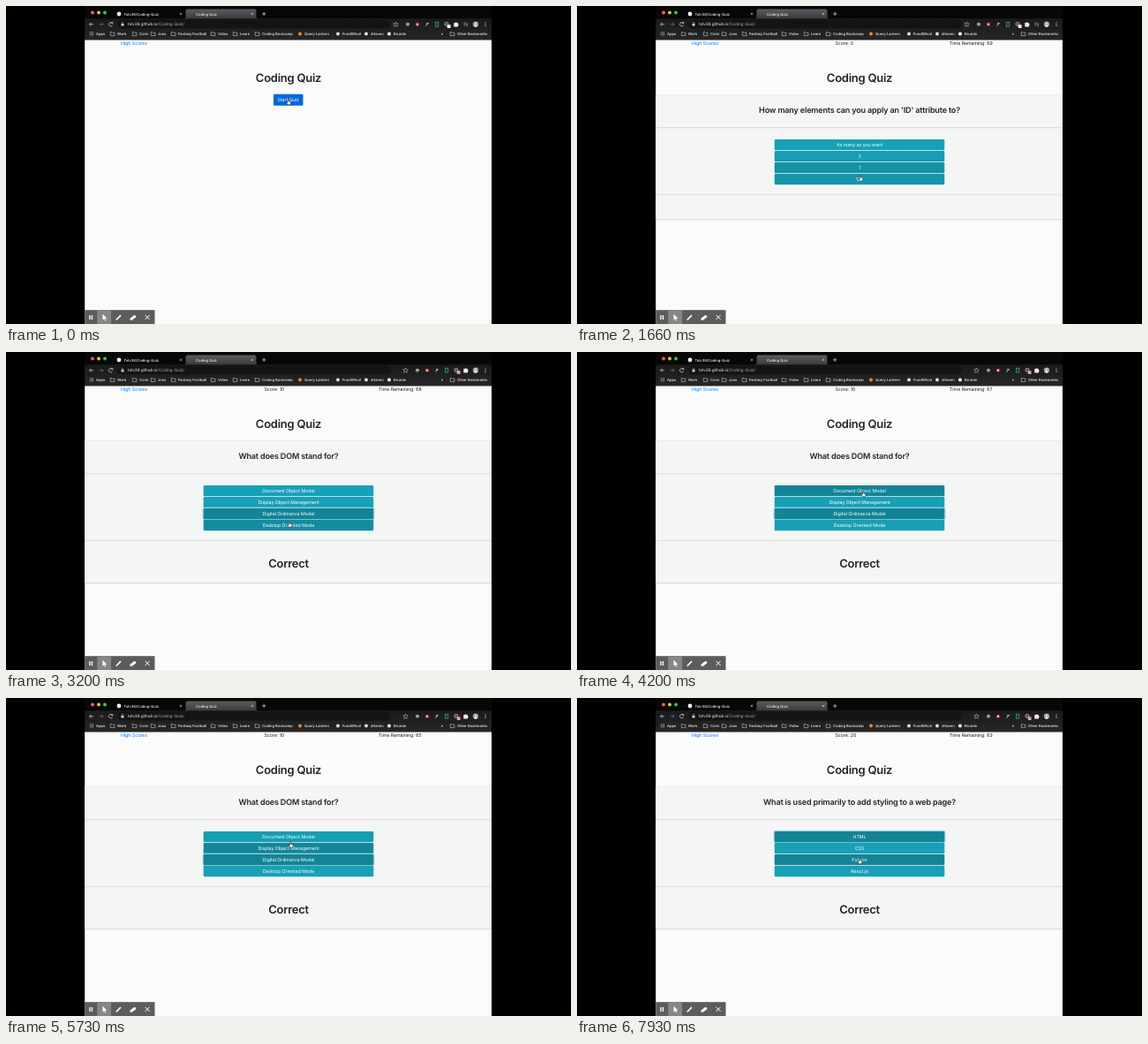
Animation of 640x360 px, one loop 8 s. Source, as an HTML page:

```html
<!DOCTYPE html>
<html lang="en">
<head>
<meta charset="utf-8">
<title>Coding Quiz</title>
<style>
  html, body { margin: 0; width: 100%; height: 100%; overflow: hidden; background: #000; }
  svg { display: block; width: 100vw; height: 100vh; }
  text { font-family: Inter, Roboto, sans-serif; text-rendering: geometricPrecision; white-space: pre; letter-spacing: -0.01em; }
  .ui { font-size: 4.15px; font-weight: 500; fill: #eee; }
  .body { font-size: 5.3px; fill: #16191c; }
  .head, .ask { font-weight: 600; fill: #212529; letter-spacing: -0.02em; }
  .head { font-size: 13px; }
  .ask { font-size: 9.05px; }
  .mid { text-anchor: middle; }
  .light { fill: #fff; }
</style>
</head>
<body>
<svg id="stage" viewBox="0 0 640 360" preserveAspectRatio="none"></svg>
<script>
const LOOP = 8000;
const LEFT = 89.2, WIDTH = 460.8;
const stage = document.getElementById('stage');
const byId = id => document.getElementById(id);
const rect = (x, y, w, h, fill, more = '') =>
  `<rect x="${x}" y="${y}" width="${w}" height="${h}" fill="${fill}" ${more}/>`;
const strip = (y, h, fill, more) => rect(LEFT, y, WIDTH, h, fill, more);
const dot = (x, y, r, fill, more = '') => `<circle cx="${x}" cy="${y}" r="${r}" fill="${fill}" ${more}/>`;
const line = (d, color = '#ddd', width = 0.7) =>
  `<path d="${d}" fill="none" stroke="${color}" stroke-width="${width}"/>`;
const label = (x, y, cls, str, more = '') => `<text x="${x}" y="${y}" class="${cls}" ${more}>${str}</text>`;
const folder = x =>
  line(`M${x - 2.3} 29.6h1.7l.7.7h2.3v3.3h-4.7z`, '#ccc', 0.6);

function browserBar() {
  const folders = [[126, 'Work'], [151, 'Corin'], [172, 'Joss'], [195, 'Fantasy Football'],
    [240, 'Video'], [265, 'Learn'], [290, 'Coding Bootcamp'], [511, 'Other Bookmarks']];
  const links = [[338, 'Query Lantern', '#e8883a'], [381, 'FundWhorl', '#ddd'],
    [413, 'zHaven', '#ddd'], [439, 'Brundo', '#f4f4f4']];
  const cross = x => line(`M${x - 1.2} 7.7l2.4 2.4m0 -2.4l-2.4 2.4`, '#ddd', 0.6);
  let apps = '';
  for (let i = 0; i < 9; i++) {
    apps += rect(94.8 + i % 3 * 1.6, 29.2 + Math.floor(i / 3) * 1.6, 1.1, 1.1, ['#d66', '#7b7', '#69d'][i % 3]);
  }
  return strip(0, 14.2, '#070707') + strip(14.2, 24.1, 'url(#bar)')
    + dot(98, 7.6, 2, '#fc5b57') + dot(105, 7.6, 2, '#e5bf3c') + dot(112, 7.6, 2, '#34c748')
    + dot(128, 9, 2.4, '#f2f2f2') + label(133.5, 10.5, 'ui', 'Tolv38/Coding-Quiz') + cross(198)
    + `<path d="M202 14.2q1.5 0 1.5-2V5.5q0-2 2-2h76q2 0 2 2v6.7q0 2 1.5 2z" fill="url(#tab)"/>`
    + label(215, 10.5, 'ui', 'Coding Quiz') + cross(279)
    + line('M290 8.9h4.4m-2.2 -2.2v4.4', '#ddd', 0.7)
    + line('M99 20.7h-4.5m2 -2l-2 2l2 2', '#ddd')
    + line('M105.5 20.7h4.5m-2 -2l2 2l-2 2', '#777')
    + line('M120.6 19.5a2.2 2.2 0 1 0 .1 2.2m.1 -3.7v1.7h-1.7', '#ddd')
    + rect(126, 15.6, 310, 10, '#141414', 'rx="5"')
    + rect(130.5, 20, 3, 2.5, '#ccc') + line('M131.1 20v-.8a.9 .9 0 0 1 1.8 0v.8', '#ccc', 0.5)
    + `<text x="138" y="22.3" font-size="4.65" fill="#f0f0f0">tolv38.github.io<tspan fill="#aaa">/Coding-Quiz/</tspan></text>`
    + apps + label(102, 33, 'ui', 'Apps')
    + folders.map(([x, s]) => folder(x - 5.4) + label(x, 33, 'ui', s)).join('')
    + links.map(([x, s, c]) => dot(x - 5, 31.5, 2, c) + label(x, 33, 'ui', s)).join('')
    + label(492.7, 33, 'ui', '»')
    + toolbarIcons();
}

function toolbarIcons() {
  const puzzle = 'M507.3 19h1.5a.8 .8 0 0 1 1.6 0h1.6v1.5a.8 .8 0 0 1 0 1.6v1.5h-4.7z';
  return `<g id="icons"><path d="M441.5 18l.8 1.8 2 .2-1.5 1.3.4 2-1.7-1-1.7 1 .4-2-1.5-1.3 2-.2z" fill="none" stroke="#ddd" stroke-width=".5"/>`
    + dot(455, 20.7, 2.2, '#777') + dot(454.2, 20.4, 0.6, '#eee') + dot(455.9, 20.4, 0.6, '#eee')
    + dot(466, 20.7, 2.3, '#b9302c') + rect(465, 20, 2, 1.4, '#fff')
    + line('M475.5 22.5l3 -3.6m-2.2 .4l1.8 1.2', '#eee', 0.9)
    + rect(486.3, 18.2, 3.6, 5, '#173b2e', 'stroke="#55ad7c" stroke-width=".6"')
    + dot(499, 20.4, 2.2, '#555', 'stroke="#bbb" stroke-width=".6"')
    + rect(499.8, 21.2, 3.8, 3.8, '#f4f4f4', 'id="badge" rx=".5"')
    + `<path d="${puzzle}" fill="#eee"/></g>`
    + `<g id="media">${line('M518.5 19h3m-3 1.5h3m-3 1.5h1.8m2.3 -2.8v3', '#aaa', 0.6)}${dot(522, 22.3, 0.7, '#aaa')}</g>`
    + dot(532, 20.6, 3.2, '#9aa0a3') + dot(532, 19.6, 1.1, '#e3e3e3') + dot(532, 22.3, 1.6, '#e3e3e3')
    + [18.8, 20.6, 22.4].map(y => dot(543, y, 0.55, '#ddd')).join('');
}

function recorderBar() {
  return rect(LEFT, 344.2, 79.3, 15.8, '#5c5c5d') + rect(103.3, 344.2, 15.8, 15.8, '#868687')
    + rect(94.3, 350, 1.3, 5, '#fff') + rect(96.8, 350, 1.3, 5, '#fff')
    + '<path d="M109.5 348.7v7l1.7-1.6 1.1 2.3 1-.5-1.1-2.2h2.2z" fill="#fff"/>'
    + line('M125.2 355l4.8 -4.8', '#fff', 1.7) + '<path d="M124.4 355.8l.5-1.8 1.3 1.3z" fill="#fff"/>'
    + '<path d="M140.6 353.6l4.6-3.6 2.3.8-.5 1.7-4.4 3.2-2.2-.3z" fill="#fff"/>'
    + line('M157.6 349.9l5 5m0 -5l-5 5', '#fff', 1);
}

const optionTop = i => 150.9 + i * 13;

function quizArea() {
  const band = '#f4f5f5', edge = '#d4d4d4', faint = '#e6e6e6';
  let options = '';
  for (let i = 0; i < 4; i++) {
    options += rect(223.2, optionTop(i) - 0.5, 193.6, 13.3, 'none', `id="ring${i}" rx="1.5" stroke="#9bd5df" stroke-width="1.2"`)
      + rect(223.7, optionTop(i), 192.6, 12.3, '#17a2b8', `id="opt${i}" rx="1.2"`)
      + label(320, optionTop(i) + 8, 'body light mid', '', `id="txt${i}"`);
  }
  return `<g id="quiz">
    ${strip(100.3, 37.4, band)}${strip(100, 0.7, faint)}${strip(137.2, 0.7, edge)}
    ${strip(138.8, 74.7, band)}${strip(138.6, 0.7, faint)}${strip(213, 0.7, edge)}
    ${strip(215, 27, band, 'id="result"')}${strip(214.6, 0.7, faint)}
    ${strip(241.5, 0.8, '#cdcdcd', 'id="resultEdge"')}
    ${label(292.5, 44.4, 'body', '', 'id="score"')}
    ${label(422, 44.4, 'body', '', 'id="timer"')}
    ${label(320, 121.3, 'ask mid', '', 'id="question"')}
    ${label(320, 244, 'head mid', 'Correct', 'id="verdict"')}
    ${options}</g>`;
}

stage.innerHTML = `<defs>
    <linearGradient id="tab" x2="0" y2="1"><stop stop-color="#5c5c5e"/><stop offset="1" stop-color="#3c3c3e"/></linearGradient>
    <linearGradient id="bar" x2="0" y2="1"><stop stop-color="#1a1a1a"/><stop offset="1" stop-color="#262627"/></linearGradient>
  </defs>
  ${rect(0, 0, 640, 360, '#000')}
  ${strip(38.3, 321.7, '#fbfbfb')}
  ${browserBar()}
  ${label(130, 44.4, 'body', 'High Scores', 'style="fill:#007bff"')}
  ${label(320, 85.6, 'head mid', 'Coding Quiz')}
  <g id="start">${rect(303, 99.7, 33.5, 13.1, '#0069d9', 'rx="1.3"')}${label(319.7, 108.1, 'body light mid', 'Start Quiz')}</g>
  ${quizArea()}
  ${recorderBar()}
  <circle id="press" fill="none" stroke="#c2202c" stroke-width="1.1"/>
  <g id="hand"><path d="M-.7 .4q.7-.9 1.3 0v2l2 .5q.6.3.4 1.1l-.6 2.2h-3l-1.7-2.3q0-.8 1.6 0z" fill="#fff" stroke="#111" stroke-width=".55"/></g>
  <g id="beam">${line('M-1.2 -3q1.2 0 1.2 .8v4.4q0 .8 -1.2 .8m2.4 -6q-1.2 0 -1.2 .8v4.4q0 .8 1.2 .8', '#222', 0.6)}</g>
  <g id="arrow"><path d="M0 0v5.4l1.3-1.2.9 1.9.9-.4-.9-1.9h1.7z" fill="#111" stroke="#fff" stroke-width=".4"/></g>`;

const rounds = [
  { from: 480, score: 0, ask: "How many elements can you apply an 'ID' attribute to?",
    options: ['As many as you want', '3', '1', '128'] },
  { from: 2390, score: 10, ask: 'What does DOM stand for?',
    options: ['Document Object Model', 'Display Object Management', 'Digital Ordinance Model', 'Desktop Oriented Mode'] },
  { from: 6240, score: 20, ask: 'What is used primarily to add styling to a web page?',
    options: ['HTML', 'CSS', 'Python', 'React.js'] }
];
const TIMER_FROM = 1480;
const presses = [[400, 560, 319, 107], [2150, 2440, 318, 184], [6090, 6370, 322, 160]];

// time, x, y of the pointer's hot spot
const path = [[0, 319.7, 105.6], [520, 319.7, 105.6], [860, 324, 124], [1250, 324, 124], [1650, 321, 192],
  [1980, 319, 182], [2860, 319, 182], [3200, 321, 192], [3640, 324, 157.5], [4220, 324, 157.5],
  [4700, 322, 194], [5060, 321, 233], [5250, 321, 220], [5540, 322, 172], [5860, 322.5, 158],
  [7060, 323, 158], [7480, 321, 193], [7860, 320, 181.5], [8000, 320, 181.5]];

function pointerAt(t) {
  const i = Math.max(1, path.findIndex(p => p[0] > t));
  const [a, b] = [path[i - 1], path[i]];
  const u = Math.max(0, (t - a[0]) / (b[0] - a[0]));
  const ease = u * u * (3 - 2 * u);
  return [a[1] + (b[1] - a[1]) * ease, a[2] + (b[2] - a[2]) * ease];
}

const optionUnder = y => y >= 150.9 && y < 202.5 ? Math.floor((y - 150.9) / 13) : -1;

// Share of the last 150 ms the pointer spent over an option, as its colour fade.
function hoverAmount(t, option) {
  let hits = 0;
  for (let k = 0; k < 10; k++) hits += optionUnder(pointerAt(Math.max(0, t - k * 15))[1]) === option;
  return hits / 10;
}

const mix = (a, b, u) => `rgb(${a.map((v, i) => Math.round(v + (b[i] - v) * u))})`;
const show = (id, on) => byId(id).setAttribute('visibility', on ? 'visible' : 'hidden');
const write = (id, str) => { if (byId(id).textContent !== str) byId(id).textContent = str; };

function drawQuiz(t) {
  const round = rounds.filter(r => r.from <= t).pop();
  byId('quiz').style.display = round ? '' : 'none';
  byId('start').style.display = round ? 'none' : '';
  if (!round) return;

  const answered = round.score > 0;
  const bottom = answered ? 261.3 : 241.5;
  byId('result').setAttribute('height', bottom - 215);
  byId('resultEdge').setAttribute('y', bottom);
  byId('verdict').style.display = answered ? '' : 'none';
  write('score', 'Score: ' + round.score);
  write('timer', t < TIMER_FROM ? '' : 'Time Remaining: ' + (69 - Math.floor((t - TIMER_FROM) / 1000)));
  write('question', round.ask);

  const focus = t < 2150 ? -1 : t < 6090 ? 2 : 0;
  const pressed = presses.some(([from], i) => i && t >= from && t < rounds[i].from);
  for (let i = 0; i < 4; i++) {
    const focused = i === focus;
    write('txt' + i, round.options[i]);
    byId('ring' + i).style.display = focused ? '' : 'none';
    byId('opt' + i).setAttribute('fill', focused && pressed ? '#117a8b'
      : mix([23, 160, 183], [19, 132, 150], focused ? 1 : hoverAmount(t, i)));
  }
}

function drawPointer(t) {
  const [x, y] = pointerAt(t);
  const started = t >= rounds[0].from;
  const kind = !started || optionUnder(y) >= 0 ? 'hand' : y > 112 && y < 128 ? 'beam' : 'arrow';
  for (const id of ['hand', 'beam', 'arrow']) {
    show(id, id === kind);
    byId(id).setAttribute('transform', `translate(${x} ${y})`);
  }
  const press = presses.find(([from, to]) => t >= from && t < to);
  show('press', press);
  if (press) {
    const ring = byId('press');
    ring.setAttribute('cx', press[2]);
    ring.setAttribute('cy', press[3]);
    ring.setAttribute('r', 5 + 6 * Math.min(1, (t - press[0]) / 90));
    ring.setAttribute('opacity', Math.min(1, (press[1] - t) / 100));
  }
}

function draw(t) {
  const shifted = t >= 2150;
  byId('icons').setAttribute('transform', `translate(${shifted ? 11 : 0} 0)`);
  byId('badge').setAttribute('fill', shifted ? '#e8a09c' : '#f4f4f4');
  show('media', !shifted);
  drawQuiz(t);
  drawPointer(t);
}

const began = performance.now();
function tick() {
  draw((performance.now() - began) % LOOP);
  requestAnimationFrame(tick);
}
tick();
</script>
</body>
</html>
```
